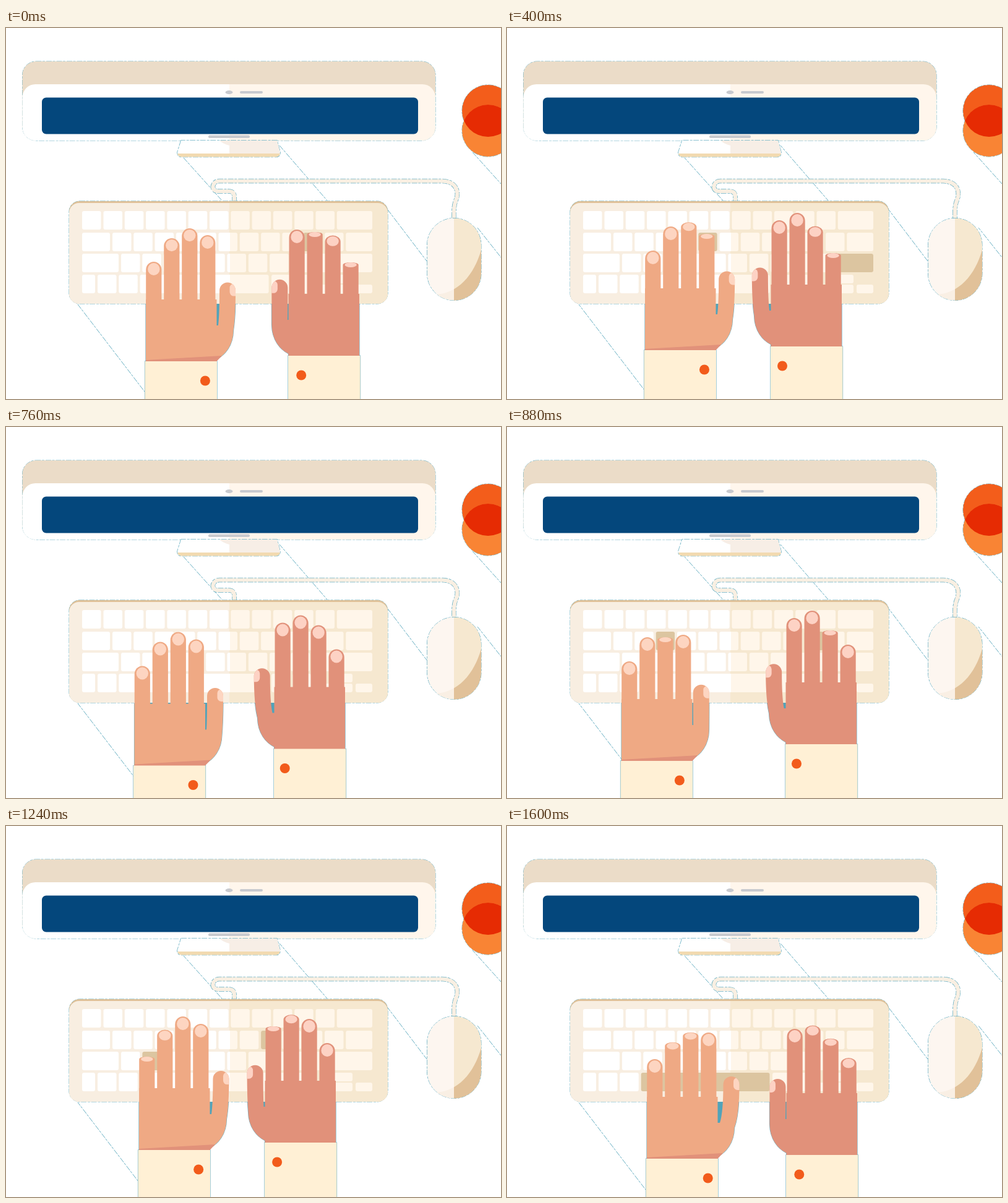
An HTML page with a canvas for the animation above (1.64 s loop, 800 by 600 pixels).

```html
<!DOCTYPE html>
<html lang="en">
<head>
<meta charset="utf-8">
<title>Typing hands</title>
<style>
html, body { margin: 0; width: 100%; height: 100%; overflow: hidden; background: #fff; }
canvas { display: block; }
</style>
</head>
<body>
<canvas id="stage" width="800" height="600"></canvas>
<script>
const ctx = document.getElementById('stage').getContext('2d');
const LOOP = 1640, STEP = 40;
const TEAL = '#51a3b9', EDGE = '#69b0c3', KEYBOARD_BOTTOM = 446;
const PINKY = 0, RING = 1, MIDDLE = 2, INDEX = 3, THUMB = 4;
const FINGER_LENGTHS = [61, 100, 116, 104];
const FINGER_WIDTH = 25.2, FINGER_PITCH = 29;

// path: where the palm's outer corner rests at each beat.
// strokes: moment and finger, with the row and column of the key it lands on.
const beats = [0, 160, 400, 640, 880, 1240, 1600];
const left = {
  skin: '#efa984', nail: '#fdd5c1', shade: '#e1917a', mirror: 1, inset: 0.2,
  spread: t => 3 - 3 * wave(2 * t / LOOP - 0.15),
  path: [[226, 439], [189, 422], [223, 421], [230, 455], [185, 440], [215, 424], [226, 438]],
  strokes: [
    [160, PINKY, 2, 1], [400, INDEX, 1, 5], [640, RING, 2, 3], [880, MIDDLE, 1, 3],
    [1240, PINKY, 2, 2], [1560, RING], [1560, MIDDLE], [1580, THUMB, 3, 3]
  ]
};
const right = {
  skin: '#e1917a', nail: '#fdd2c4', mirror: -1, inset: 1.3,
  spread: t => 3.6 - 3.6 * wave(t / LOOP + 0.05),
  path: [[571, 430], [547, 435], [541, 415], [531, 428], [565, 413], [533, 412], [566, 432]],
  strokes: [
    [20, MIDDLE, 1, 10], [20, PINKY], [160, INDEX, 1, 9], [400, PINKY, 2, 11],
    [640, MIDDLE, 0, 10], [880, RING, 1, 10], [1240, INDEX, 1, 8], [1560, RING]
  ]
};

function wave(turns) {
  return Math.cos(turns * Math.PI * 2);
}
function loopDistance(a, b) {
  const d = Math.abs(a - b);
  return Math.min(d, LOOP - d);
}

function keyRow(y, firstWidth, count, lastWidth) {
  const row = [[123, y, firstWidth, 30]];
  const start = 123 + firstWidth + 4;
  for (let i = 0; i < count; i++) row.push([start + i * 34.3, y, 30.5, 30]);
  const x = start + count * 34.3;
  row.push([x, y, lastWidth || 592 - x, 30]);
  return row;
}
const keys = [
  keyRow(296, 30.5, 11),
  keyRow(331, 45, 11),
  keyRow(365, 59, 10),
  [...keyRow(399, 21, 2, 208), [429, 399, 30, 30], [463, 399, 30, 30], [497, 415, 28, 14],
    [530, 399, 30, 14], [530, 415, 30, 14], [565, 415, 27, 14]]
];

function split(x, colorA, colorB) {
  const g = ctx.createLinearGradient(0, 0, 800, 0);
  g.addColorStop(x / 800, colorA);
  g.addColorStop(x / 800, colorB);
  return g;
}
function box(x, y, w, h, r = 0) {
  const p = new Path2D();
  p.roundRect(x, y, w, h, r);
  return p;
}
function oval(x, y, rx, ry = rx) {
  const p = new Path2D();
  p.ellipse(x, y, rx, ry, 0, 0, Math.PI * 2);
  return p;
}
function fill(path, color) {
  ctx.fillStyle = color;
  ctx.fill(path);
}
function stroke(path, color, width) {
  ctx.strokeStyle = color;
  ctx.lineWidth = width;
  ctx.stroke(path);
}
function clipped(path, draw) {
  ctx.save();
  ctx.clip(path);
  draw();
  ctx.restore();
}
// Thin broken edge that shimmers from step to step.
function edge(path, frame, width = 1) {
  ctx.save();
  ctx.setLineDash([9, 1.5, 4, 2]);
  ctx.lineDashOffset = frame * 7;
  stroke(path, EDGE, width);
  ctx.restore();
}

function drawShadowEdges(frame) {
  edge(new Path2D('M287 210L349 279M442 190L519 279M617 294L680 377M762 323L800 371M754 201L800 252M116 447L240 609'), frame);
}

function drawMonitor(frame) {
  const shell = box(26.5, 54, 667.5, 128, 22);
  edge(shell, frame);
  fill(shell, '#ebdcc8');
  fill(box(26.5, 91, 667.5, 91, 21), split(361, '#fff', '#fff6ec'));
  fill(box(58, 112.5, 608, 59, 7), '#04477c');
  fill(oval(360.5, 104, 6, 3), '#c8cacf');
  fill(box(378, 102, 37, 4, 2), '#c8cacf');
  const stand = new Path2D('M283 182L277 201Q277 208 283 208.500H437Q443 208 443 201L438 182Z');
  edge(stand, frame, 1.6);
  clipped(stand, () => {
    fill(box(270, 182, 180, 30), '#fff');
    fill(new Path2D('M345 182Q352 188 361 190V203H450V182Z'), '#f7eee6');
    fill(box(270, 203, 180, 8), '#f2dab0');
  });
  fill(box(327, 173.5, 67, 4.5, 2), '#c8cacf');
}

function drawCup(frame) {
  const top = oval(779, 134, 42), bottom = oval(779, 166, 42);
  edge(top, frame);
  edge(bottom, frame);
  fill(top, '#f35d1b');
  fill(bottom, '#f98434');
  clipped(top, () => fill(bottom, '#e62b03'));
}

function drawMouse(frame) {
  const cable = new Path2D('M369 282V273Q369 264 360 264H342C331 264 332 247.500 345 247.500H705C728 248 733 265 727 279Q723 288 724 309');
  edge(cable, frame, 7.6);
  stroke(cable, '#f9efe2', 6.2);
  const body = box(680.5, 307.5, 87.5, 133, 43.7);
  edge(body, frame);
  clipped(body, () => {
    fill(body, split(724, '#fdf6f0', '#f6e8d0'));
    fill(new Path2D('M769 355C758 397 732 431 690 431V445H770Z'), split(724, '#f9efe4', '#e1c199'));
  });
}

function drawKeyboard(time, frame) {
  const base = box(102, 280, 515, 166, 17);
  edge(base, frame);
  fill(base, '#dfc199');
  fill(box(102, 283, 515, 163, 16), split(361, '#f8eee1', '#f6e8d0'));
  const idle = split(362, '#fff', '#fff6ea');
  keys.flat().forEach(key => fill(box(...key, 3), idle));
  for (const [at, , row, column] of [...left.strokes, ...right.strokes]) {
    if (row !== undefined && loopDistance(time, at) <= 40) {
      fill(box(...keys[row][column], 3), '#dcc5a0');
    }
  }
}

function positionAt(path, time) {
  const i = beats.findLastIndex(beat => beat <= time);
  const next = (i + 1) % beats.length;
  const u = (time - beats[i]) / ((beats[next] || LOOP) - beats[i]);
  const ease = u * u * (3 - 2 * u);
  return path[i].map((a, axis) => a + (path[next][axis] - a) * ease);
}

// How far each finger is down, 0 to 1. Outer fingers drag their neighbour along.
function pressesAt(strokes, time) {
  const down = [0, 0, 0, 0, 0];
  const push = (finger, amount) => { down[finger] = Math.max(down[finger], amount); };
  for (const [at, finger] of strokes) {
    const amount = Math.min(1, Math.max(0, 1.4 - loopDistance(time, at) / 60));
    push(finger, amount);
    if (finger === PINKY) push(RING, amount * 0.35);
    if (finger === INDEX) push(MIDDLE, amount * 0.58);
  }
  return down;
}

function thumbPath(x, y, spread) {
  const p = new Path2D();
  p.moveTo(114, 100);
  p.lineTo(114, 42);
  p.lineTo(116 + spread * 0.2, 42);
  p.quadraticCurveTo(x, 25, x, y + 13);
  p.arc(x + 13, y + 13, 13, Math.PI, 0);
  p.quadraticCurveTo(x + 26, 28, 141.5, 50);
  p.bezierCurveTo(141, 75, 128, 90, 114, 97);
  p.closePath();
  return p;
}

function drawFinger(hand, index, press) {
  const x = hand.inset + index * FINGER_PITCH;
  const tip = press * (index === PINKY ? 10 : 16) - FINGER_LENGTHS[index];
  const rx = FINGER_WIDTH / 2, ry = 13 * (1 - 0.7 * press);
  const finger = new Path2D();
  finger.moveTo(x, 2);
  finger.ellipse(x + rx, tip + ry, rx, ry, 0, Math.PI, 0);
  finger.lineTo(x + FINGER_WIDTH, 2);
  fill(finger, hand.skin);
  fill(oval(x + rx, tip + 12 - 8 * press, 9.7, 10 - 6 * press), hand.nail);
}

function drawHand(hand, time) {
  const [x, y] = positionAt(hand.path, time);
  const presses = pressesAt(hand.strokes, time);
  const spread = hand.spread(time) + presses[THUMB] * 8;
  const thumbX = 115.5 + spread * 0.8, thumbY = -23 - spread;
  const thumb = thumbPath(thumbX, thumbY, spread);
  const palm = box(0, 0, 114.5, 101);
  const cuff = box(-1.5, 100, 116.5, 200);

  ctx.save();
  ctx.translate(x, y);
  ctx.scale(hand.mirror, 1);

  clipped(box(-20, KEYBOARD_BOTTOM - y, 200, 300), () => {
    [thumb, palm, cuff].forEach(part => stroke(part, EDGE, 1.2));
    fill(box(1, -20, thumbX + 9, 62), TEAL);
  });

  fill(thumb, hand.skin);
  fill(palm, hand.skin);
  clipped(thumb, () => fill(box(thumbX + 16.5, thumbY + 2, 16, 20, 6.5), hand.nail));
  FINGER_LENGTHS.forEach((_, i) => drawFinger(hand, i, presses[i]));

  if (hand.shade) fill(new Path2D('M0 98L123 91L114 100.500H0Z'), hand.shade);
  fill(cuff, '#fff0d5');
  fill(oval(93.7 + spread * 0.5, 131.5, 8), '#f25b1b');
  ctx.restore();
}

function draw(now) {
  const frame = Math.floor((now % LOOP) / STEP);
  const time = frame * STEP;
  ctx.fillStyle = '#fff';
  ctx.fillRect(0, 0, 800, 600);
  drawShadowEdges(frame);
  drawMonitor(frame);
  drawCup(frame);
  drawMouse(frame);
  drawKeyboard(time, frame);
  drawHand(left, time);
  drawHand(right, time);
}

const start = performance.now();
function tick() {
  draw(performance.now() - start);
  requestAnimationFrame(tick);
}
tick();
</script>
</body>
</html>
```
